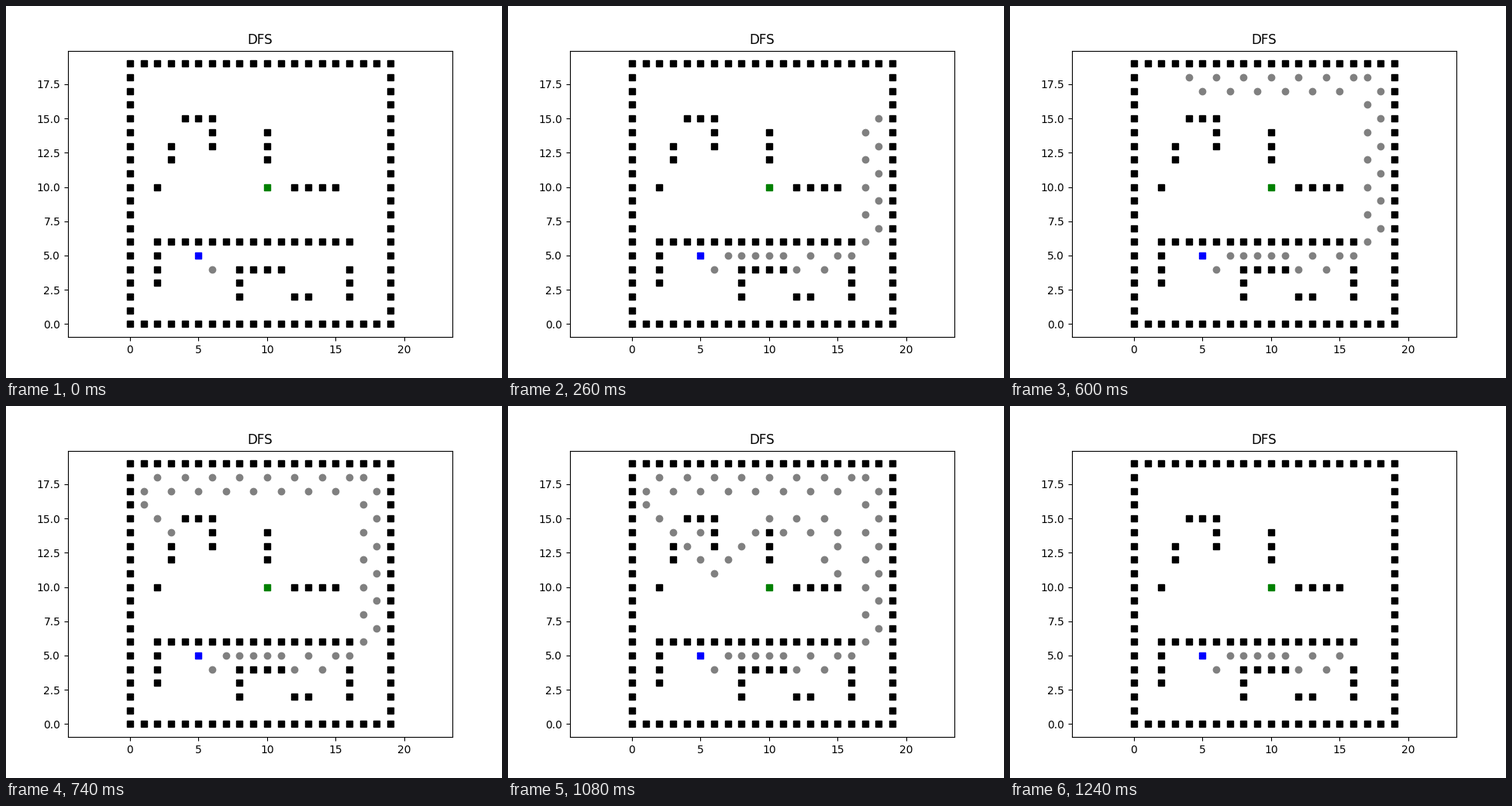
A matplotlib script for the animation above (1260 ms loop, 640x480 px).

```python
from itertools import pairwise, product

import matplotlib.pyplot as plt
from matplotlib.animation import FuncAnimation

END = 19
START, GOAL = (5, 5), (10, 10)
# Straight moves first, then diagonals; the last free one is explored first.
MOVES = [(1, 0), (0, 1), (-1, 0), (0, -1), *product((-1, 1), repeat=2)]


def wall(*corners):
    """Cells along a line of straight wall pieces between corners."""
    cells = set()
    for (x0, y0), (x1, y1) in pairwise(corners):
        xs = range(min(x0, x1), max(x0, x1) + 1)
        ys = range(min(y0, y1), max(y0, y1) + 1)
        cells.update(product(xs, ys))
    return cells


def build_maze():
    border = wall((0, 0), (END, 0), (END, END), (0, END), (0, 0))
    lower = (wall((2, 3), (2, 6), (16, 6))
             | wall((8, 2), (8, 4), (11, 4))
             | wall((12, 2), (13, 2))
             | wall((16, 2), (16, 4)))
    upper = (wall((4, 15), (6, 15), (6, 13))
             | wall((3, 12), (3, 13))
             | wall((10, 12), (10, 14))
             | wall((12, 10), (15, 10)))
    return border | lower | upper | {(2, 10)}


def depth_first(walls):
    """Cells in the order they are visited, from after START to GOAL."""
    pending, closed, visited = {START: None}, set(), []
    while pending:
        cell, _ = pending.popitem()
        closed.add(cell)
        visited.append(cell)
        if cell == GOAL:
            break
        for dx, dy in MOVES:
            near = (cell[0] + dx, cell[1] + dy)
            if near not in walls and near not in closed:
                pending.setdefault(near)
    return visited[1:]


maze = build_maze()
visited = depth_first(maze)
# Steps play in alphabetical order of their numbers: 0, 1, 10, 11, ..., 2, 20
order = sorted(range(len(visited)), key=str)

fig, ax = plt.subplots(figsize=(6.4, 4.8), dpi=100)
ax.plot(*zip(*sorted(maze)), "sk")
ax.plot(*START, "sb")
ax.plot(*GOAL, "sg")
ax.axis("equal")
ax.set_title("DFS")
dots, = ax.plot([], [], "o", color="gray")


def update(frame):
    dots.set_data(*zip(*visited[:order[frame] + 1]))
    return [dots]


anim = FuncAnimation(fig, update, frames=len(order), interval=20,
                     repeat=True, repeat_delay=0)
plt.show()
```
